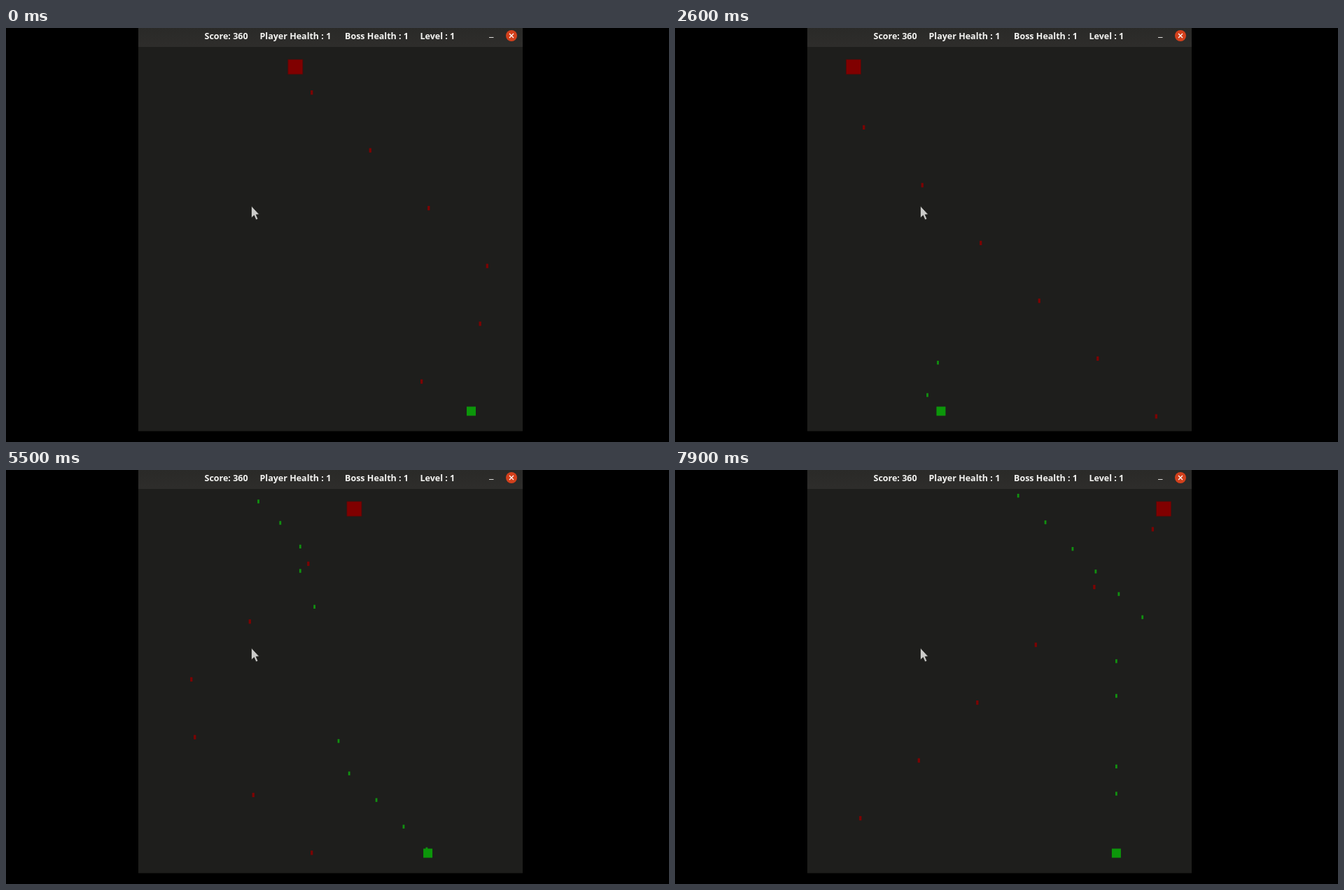
Animation of 947 by 591 pixels, one loop 8 s. Source, as an HTML page:

```html
<!DOCTYPE html>
<html lang="en">
<head>
<meta charset="utf-8">
<title>Boss fight</title>
<style>
  html, body { margin: 0; width: 100%; height: 100%; overflow: hidden; background: #000; }
  svg { display: block; width: 947px; height: 591px; }
  text { font: bold 12.5px "Open Sans", "Noto Sans", sans-serif; fill: #f4f4f2; }
</style>
</head>
<body>
<svg viewBox="0 0 947 591">
  <defs>
    <linearGradient id="bar" x2="0" y2="1">
      <stop offset="0" stop-color="#2a2a28"/>
      <stop offset="1" stop-color="#2e2d2b"/>
    </linearGradient>
  </defs>
  <rect x="189" y="27" width="549" height="548.5" fill="#1e1e1c"/>
  <g id="shots"></g>
  <rect id="boss" x="-10.5" y="45" width="21" height="21" fill="#800000" stroke="#500a09" stroke-width=".8"/>
  <rect id="player" x="-6.5" y="540.5" width="13" height="13" fill="#0c960a"/>
  <rect x="189" width="549" height="27" fill="url(#bar)"/>
  <text x="283.5" y="16">Score: 360</text>
  <text x="362.5" y="16">Player Health : 1</text>
  <text x="484" y="16">Boss Health : 1</text>
  <text x="591.5" y="16">Level : 1</text>
  <path d="M690 13.5h6.5" stroke="#deddda"/>
  <circle cx="722" cy="11" r="8" fill="#d2401c"/>
  <path d="M719 8l6 6m0-6l-6 6" stroke="#fff" stroke-width="1.3"/>
  <path d="M350.5 254v17l3.9-3.5 2.7 6.3 2.8-1.2-2.7-6.1 4.4-.4z"
        fill="#cbcbc9" stroke="#222220" stroke-width=".8"/>
</svg>
<script>
const LOOP = 8000, STEP = 100;

// Speeds in pixels per ms
const FALL = 0.0826, RISE = 2 * FALL, BOSS_SPEED = 0.0836, RUN = 0.169;

// The boss paces between two walls, turning at the left one at TURN.
const LEFT = 225.5, RIGHT = 724, TURN = 2247;
const BOSS_MUZZLE = 69, BOSS_SHOTS = 14, FIRST_SHOT = -5275, RELOAD = 999;
const PLAYER_MUZZLE = 543, CEILING = 30, FLOOR = 569.8;

// The player's key presses: [start, destination] for runs, times for shots.
const START_X = 664.5;
const runs = [[495, 347], [2405, 420.3], [3250, 440.6], [4350, 475], [4745, 669], [5920, 630.4]];
const taps = [2205, 2485, 2670, 2875, 3085, 3395, 4555, 4835, 5065,
  5295, 5490, 5685, 5885, 6265, 6565, 7175, 7410];

const byId = id => document.getElementById(id);

function bossX(t) {
  const span = RIGHT - LEFT;
  const p = Math.abs(t - TURN) * BOSS_SPEED % (2 * span);
  return LEFT + span - Math.abs(span - p);
}

function playerX(t) {
  let x = START_X;
  for (const [start, goal] of runs) {
    const reach = Math.max(0, t - start) * RUN;
    x += Math.sign(goal - x) * Math.min(Math.abs(goal - x), reach);
  }
  return x;
}

function makeShot(born, x, y, speed, fill, w, h) {
  const el = document.createElementNS("http://www.w3.org/2000/svg", "rect");
  const attrs = { x: x - w / 2, y: -h / 2, width: w, height: h, fill };
  for (const name in attrs) el.setAttribute(name, attrs[name]);
  byId("shots").append(el);
  return { el, born, y, speed };
}

const shots = [
  ...Array.from({ length: BOSS_SHOTS }, (_, i) => {
    const born = FIRST_SHOT + i * RELOAD;
    return makeShot(born, bossX(born), BOSS_MUZZLE, FALL, "#7c0303", 3.3, 6.2);
  }),
  ...taps.map(born =>
    makeShot(born, playerX(born), PLAYER_MUZZLE, -RISE, "#119010", 2.8, 5.4))
];

function place(el, x, y) {
  el.setAttribute("transform", `translate(${x} ${y})`);
}

function draw(now) {
  const t = Math.floor(now % LOOP / STEP) * STEP;
  place(byId("boss"), bossX(t), 0);
  place(byId("player"), playerX(t), 0);
  for (const { el, born, y, speed } of shots) {
    const pos = y + (t - born) * speed;
    const live = t >= born && pos >= CEILING && pos <= FLOOR;
    place(el, 0, pos);
    el.setAttribute("visibility", live ? "visible" : "hidden");
  }
}

const start = performance.now();
function tick() {
  draw(performance.now() - start);
  requestAnimationFrame(tick);
}
tick();
</script>
</body>
</html>
```
